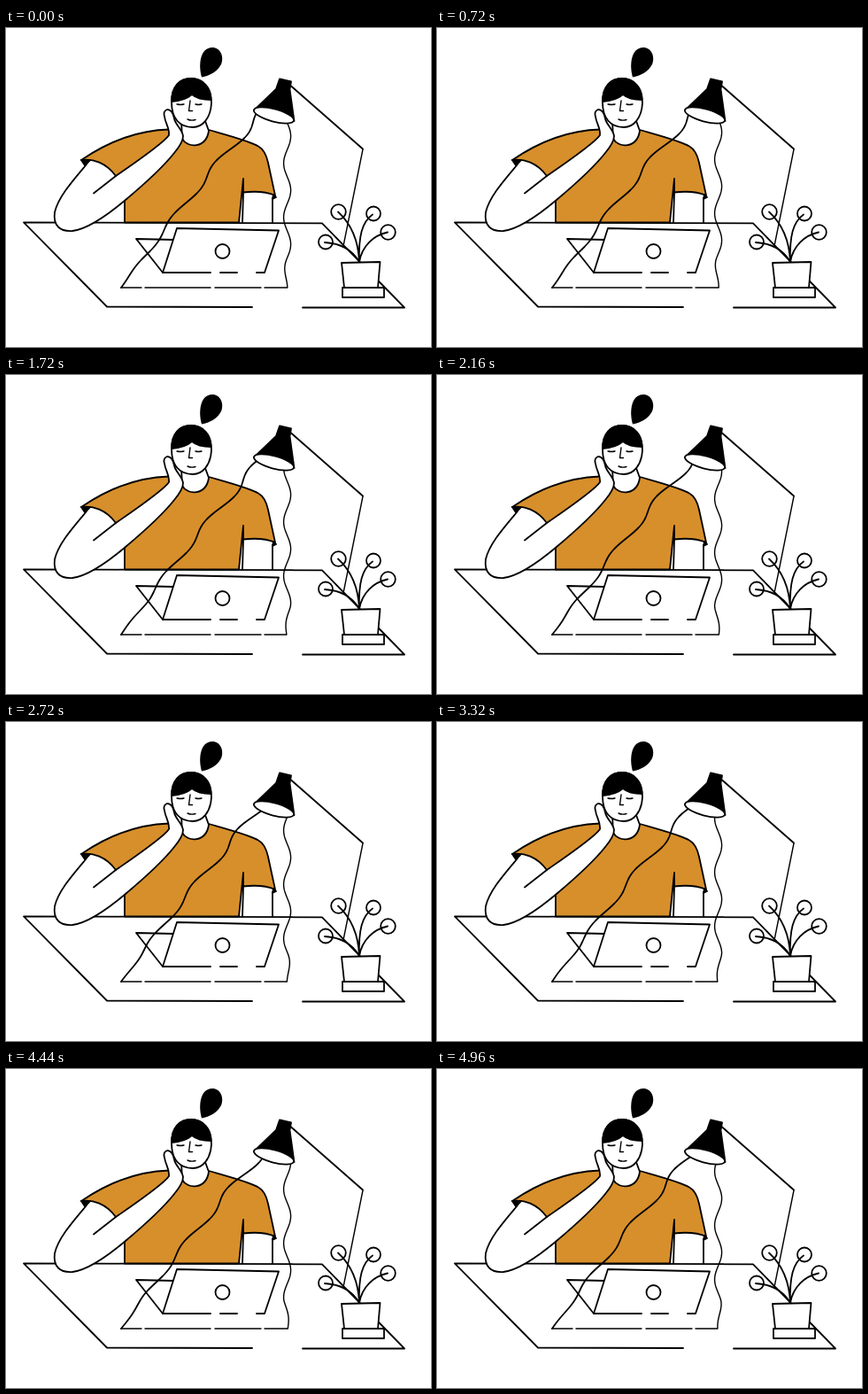
An HTML page for the animation above (5000 ms loop, 480 by 360 pixels).

```html
<!DOCTYPE html>
<html lang="en">
<head>
<meta charset="utf-8">
<title>Desk lamp</title>
<style>
  html, body { margin: 0; width: 100%; height: 100%; overflow: hidden; background: #fff; }
  svg { display: block; width: 100%; height: 100%; }
  .line { fill: none; stroke: #000; stroke-width: 1.8; stroke-linejoin: round; stroke-linecap: round; }
  .thin { stroke-width: 1.4; }
  .white { fill: #fff; }
  .black { fill: #000; }
  .shirt { fill: #d78f2b; }
</style>
</head>
<body>
<svg viewBox="0 0 480 360">
  <g class="line" id="desk">
    <path d="M278 315L114 314.500L20 219.300L357 220.300L450 315.500H335"/>
  </g>

  <g class="line" id="person">
    <path class="shirt" d="M184 114.500C150 115.500 115 128.500 85 149L124 167L134 194V219.500H263L268 170V185.500Q290 183 304 189L296 152Q293 138 285 133.500C275 127.500 250 121 229 115L199 122Z"/>
    <path d="M268 186L267 219.500M301 192V219.500"/>
    <path class="black" d="M302 188L305 191L301 193Z"/>
    <path class="white" d="M198 105L199 125C205 136 226 136 229 116L225 105Z"/>
    <path class="white" d="M187 84C187 66 196 57 209 57S232 67 232 85C231 102 222 112 211 112C196 112 187 102 187 84Z"/>
    <path class="black" d="M187 83C187 66 196 57 209 57S232 67 231.500 81Q217 81 210 75Q202 82 187 83Z"/>
    <path class="black" stroke="none" d="M221 55.500C217 42 219 22 233 22C242 22 246.500 32 243 41C239 49 230 54 221 55.500Z"/>
    <path class="thin" d="M193 86Q197 87 201 86M214 86Q217 87 221 86M208 82L206.500 93.500H210.500M205 103Q209 105 214 103.500"/>
    <path class="white" d="M94 149L90 155C74 174 59 191 55 208C53 223 61 230 75 229C92 227 116 210 135 194C160 173 179 155 190 141Q200 129 200 122C199 114 191 109 190 102Q188 92 182 92Q177 94 179 100C180 108 185 113 184 121Q178 130 124 167C113 152 98 147 85 149Z"/>
    <path d="M124 167L99 186.500"/>
    <path class="black" d="M85 149L95 149L89 155Z"/>
  </g>

  <g class="line" id="laptop">
    <path d="M190 239L147 238L177 276"/>
    <path class="white" stroke="none" d="M193 226L308 228.500L292 276H177Z"/>
    <path d="M231 276H177L193 226L308 228.500L292 276H283M242 276H261"/>
    <circle cx="244.500" cy="252" r="8"/>
  </g>

  <path class="line" id="left"/>
  <path class="line thin" id="right"/>

  <g class="line" id="lamp">
    <path d="M322 65.500L403 136.500"/>
    <path class="thin" d="M403 137L381 246"/>
    <path class="black" d="M309 57.500L322 60.500L320.500 69L325.500 105L280 93L305 69Z"/>
    <ellipse class="white" cx="302.500" cy="98.500" rx="23.300" ry="7" transform="rotate(15 302.500 98.500)"/>
  </g>

  <g class="line" id="plant">
    <circle cx="375.500" cy="207.500" r="8.300"/>
    <circle cx="415" cy="209.500" r="8"/>
    <circle cx="431.500" cy="230.500" r="8.300"/>
    <circle cx="361" cy="241.500" r="8"/>
    <path d="M399 264C398 240 391 222 375 207.500M399 264C398 235 402 219 414 210.500M399 264C402 246 415 234 431 230.500M399 264C392 252 380 243 360 242"/>
    <path class="white" d="M379 265L422.500 264L420 293H382ZM380 293H427V304H380Z"/>
  </g>
</svg>
<script>
  const LOOP = 5000, PERIOD = 776, WAVELENGTH = 61, TOP = 94, FLOOR = 293;
  const [leftEdge, rightEdge] = ['left', 'right'].map(id => document.getElementById(id));

  // A ripple runs down both edges of the light.
  function edge(time, axis, amplitude, top = TOP) {
    const points = [];
    for (let y = top; y <= FLOOR; y++) {
      const depth = (y - TOP) / (FLOOR - TOP);
      const phase = 2 * Math.PI * ((y - 122) / WAVELENGTH - time / PERIOD);
      points.push([axis(depth) + amplitude(depth) * Math.cos(phase), y]);
    }
    return points;
  }

  function draw(now) {
    const time = now % LOOP;
    const left = edge(time, d => 290 - 160 * d - 4 * Math.sin(Math.PI * d), d => d < 0.8 ? 6 - 4 * d : 14 * (1 - d));
    const right = edge(time, () => 317.6, d => 4 * Math.min(1, 5.2 - 5 * d), 102);
    const [leftEnd, rightEnd] = [left, right].map(points => points.at(-1)[0]);
    leftEdge.setAttribute('d', `M${left.join('L')}`);
    rightEdge.setAttribute('d', `M${right.join('L')}` +
      `M${leftEnd} ${FLOOR}H153M157 ${FLOOR}H231M236 ${FLOOR}H288M292 ${FLOOR}H${rightEnd}`);
    requestAnimationFrame(draw);
  }
  requestAnimationFrame(draw);
</script>
</body>
</html>
```
